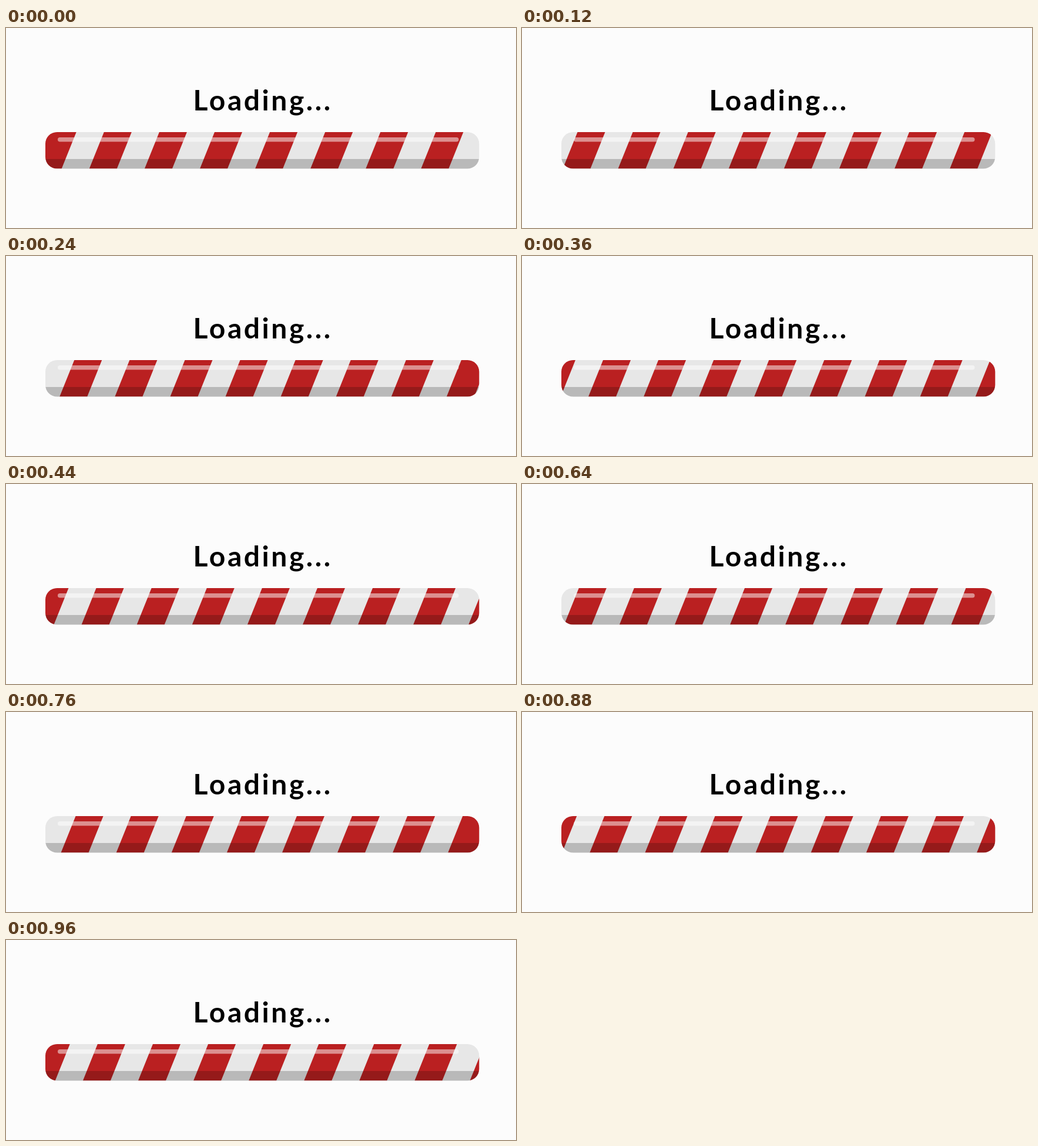
An HTML page that plays this animation: 868 by 342 pixels, repeating every 1 s.

```html
<!DOCTYPE html>
<html lang="en">
<head>
<meta charset="utf-8">
<title>Loading</title>
<style>
  html, body { margin: 0; width: 100%; height: 100%; overflow: hidden; background: #fcfcfc; }
  svg { display: block; }
  text { font: 700 48px Lato, sans-serif; letter-spacing: 3.53px; }
</style>
</head>
<body>
<svg width="868" height="342" viewBox="0 0 868 342">
  <defs>
    <clipPath id="bar"><rect x="67" y="178" width="738.3" height="62.5" rx="20"/></clipPath>
  </defs>
  <text x="318.6" y="141">Loading...</text>
  <g clip-path="url(#bar)">
    <rect x="67" y="178" width="739" height="63" fill="#e7e7e7"/>
    <path id="stripes" fill="#ba2021"/>
    <rect x="67" y="224" width="739" height="17" fill-opacity=".2"/>
  </g>
  <rect x="88" y="187" width="682.5" height="7.5" rx="3.75" fill="#fff" fill-opacity=".5"/>
</svg>
<script>
  const LOOP = 1000, STEP = 40, TICKS = 60, SHIFT = 3.11;
  const PITCH = 94.1, WIDTH = 47, COUNT = 12;
  const stripes = document.getElementById("stripes");

  // The stripes advance on 60 Hz ticks, shown at 25 frames per second.
  function draw(time) {
    const shown = Math.floor((time % LOOP) / STEP) * STEP;
    const ticks = Math.floor(shown * TICKS / 1000);
    const start = -46.4 + (ticks * SHIFT) % PITCH;
    let d = "";
    for (let i = 0; i < COUNT; i++) {
      const x = start + i * PITCH;
      d += `M${x} 240.5l25-62.5h${WIDTH}l-25 62.5z`;
    }
    stripes.setAttribute("d", d);
  }

  function tick() {
    draw(performance.now());
    requestAnimationFrame(tick);
  }
  tick();
</script>
</body>
</html>
```
